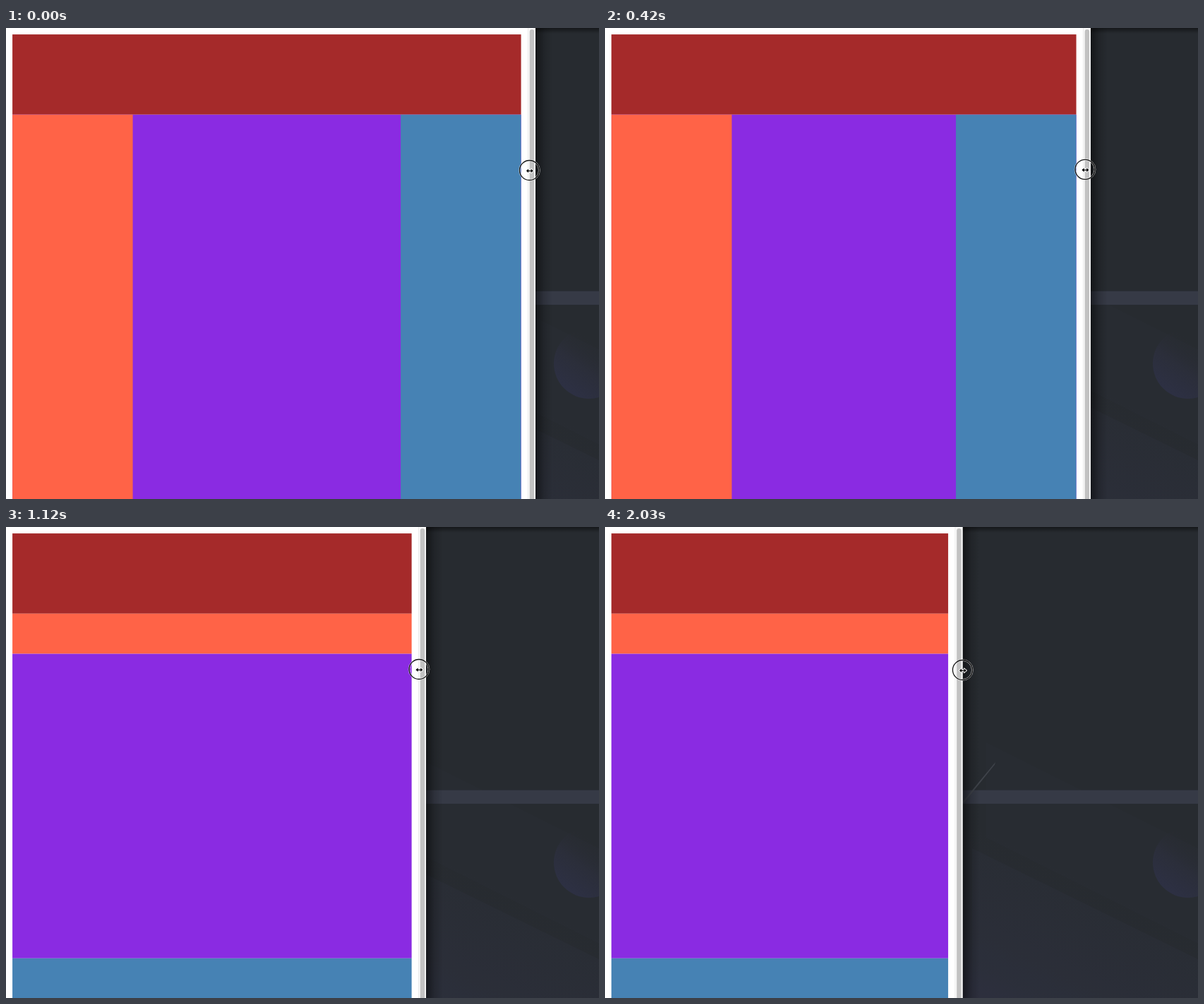
An HTML page with a canvas for the animation above (2.1 s loop, 840 by 667 pixels).

```html
<!DOCTYPE html>
<html lang="en">
<head>
<meta charset="utf-8">
<title>Responsive layout</title>
<style>
html, body { margin: 0; width: 100%; height: 100%; overflow: hidden; background: #272b31; }
canvas { display: block; }
</style>
</head>
<body>
<canvas id="stage" width="840" height="667"></canvas>
<script>
const ctx = document.getElementById('stage').getContext('2d');
const W = 840, H = 667, LOOP = 2100, STEP = 70;
const UNIT = 1.1365;            // stage pixels per page pixel
const BREAKPOINT = 600 * UNIT;

// Drag: time, window edge, pointer x, pointer y
const drag = [
  [0, 750, 741.5, 201.5],
  [350, 700, 691, 200.5],
  [630, 651, 647, 200],
  [1120, 595, 585, 201.5],
  [1400, 554, 545, 202.5],
  [1750, 525, 522, 201.5],
  [2030, 506.5, 506.5, 202.5]
];

function slope(i, k) {
  const a = drag[Math.max(i - 1, 0)], b = drag[Math.min(i + 1, drag.length - 1)];
  return (b[k] - a[k]) / (b[0] - a[0]);
}

// Cubic Hermite through the drag points
function at(t, k) {
  let i = 0;
  while (i < drag.length - 2 && t >= drag[i + 1][0]) i++;
  const a = drag[i], b = drag[i + 1], d = b[0] - a[0];
  const u = (t - a[0]) / d, v = 1 - u;
  return v * v * (1 + 2 * u) * a[k] + u * u * (3 - 2 * u) * b[k]
    + d * u * v * (v * slope(i, k) - u * slope(i + 1, k));
}

function rect(color, x, y, w, h) {
  ctx.fillStyle = color;
  ctx.fillRect(x, y, w, h);
}

function fade(x0, y0, x1, y1, ...stops) {
  const g = ctx.createLinearGradient(x0, y0, x1, y1);
  stops.forEach((c, i) => g.addColorStop(i / (stops.length - 1), c));
  return g;
}

function poly(color, ...pts) {
  ctx.fillStyle = color;
  ctx.beginPath();
  for (let i = 0; i < pts.length; i += 2) ctx.lineTo(pts[i], pts[i + 1]);
  ctx.closePath();
  ctx.fill();
}

function backdrop(edge) {
  rect('#272b30', 0, 0, W, H);
  rect(fade(540, 680, 640, 480, 'rgba(48,48,70,.6)', 'rgba(44,46,60,.3)', 'rgba(44,46,60,0)'), 480, 300, 360, 367);
  poly('rgba(48,50,62,.16)', 540, 305, 840, 455, 840, 590, 540, 440);
  poly('rgba(48,50,64,.28)', 520, 455, 840, 612, 840, 667, 520, 667);
  rect('#363a46', 480, 372.7, 360, 19.2);

  ctx.fillStyle = fade(793, 510, 838, 449, '#2d3043', '#2b2e3a', 'rgba(40,43,50,0)');
  ctx.beginPath();
  ctx.arc(826, 475, 50, 0, Math.PI * 2);
  ctx.fill();

  poly('#3f434a', 553, 333, 552, 336.5, 509, 390, 505, 391);

  rect(fade(edge, 0, edge + 24, 0, 'rgba(0,0,0,.5)', 'rgba(0,0,0,.16)', 'rgba(0,0,0,0)'), edge, 0, 24, H);
  rect(fade(0, 0, 0, 8, 'rgba(0,0,0,.45)', 'rgba(0,0,0,0)'), edge, 0, W - edge, 8);
}

function page(edge) {
  const l = 8 * UNIT, r = edge - 20.4, w = r - l, side = 150 * UNIT;
  const top = 8 * UNIT, y1 = top + 100 * UNIT, y2 = y1 + 50 * UNIT, y3 = 610.8;
  rect('#fff', 0, 0, edge, H);
  rect('#a52a2a', l, top, w, y1 - top);
  if (edge > BREAKPOINT) {
    rect('#8a2be2', l, y1, w, H - y1);
    rect('#ff6347', l, y1, side, H - y1);
    rect('#4682b4', r - side, y1, side, H - y1);
  } else {
    rect('#ff6347', l, y1, w, y2 - y1);
    rect('#8a2be2', l, y2, w, y3 - y2);
    rect('#4682b4', l, y3, w, H - y3);
  }
  rect('#fafafa', edge - 11, 0, 11, H);
  rect('#ebebeb', edge - 11, 0, 1, H);
  ctx.fillStyle = '#c2c2c2';
  ctx.beginPath();
  ctx.roundRect(edge - 8.3, 2, 6.5, H + 10, 3.2);
  ctx.fill();
}

function ring(x, y, r, color, width) {
  ctx.strokeStyle = color;
  ctx.lineWidth = width;
  ctx.beginPath();
  ctx.arc(x, y, r, 0, Math.PI * 2);
  ctx.stroke();
}

function pointer(x, y) {
  ring(x, y, 14.9, 'rgba(255,255,255,.6)', 1);
  ring(x, y, 13.1, 'rgba(255,255,255,.6)', 1);
  ring(x, y, 14, '#151515', 1.3);

  ctx.save();
  ctx.translate(x + 0.4, y + 0.8);
  ctx.beginPath();
  for (const s of [1, -1]) {
    ctx.lineTo(-1.8 * s, -0.6 * s);
    ctx.lineTo(1.8 * s, -0.6 * s);
    ctx.lineTo(1.8 * s, -2.8 * s);
    ctx.lineTo(5 * s, 0);
    ctx.lineTo(1.8 * s, 2.8 * s);
  }
  ctx.lineTo(-1.8, 0.6);
  ctx.closePath();
  ctx.lineJoin = 'round';
  ctx.strokeStyle = '#fff';
  ctx.lineWidth = 1.8;
  ctx.stroke();
  ctx.fillStyle = '#000';
  ctx.fill();
  ctx.restore();
}

function draw() {
  const t = Math.floor((performance.now() % LOOP) / STEP) * STEP;
  const edge = at(t, 1);
  backdrop(edge);
  page(edge);
  pointer(at(t, 2), at(t, 3));
  requestAnimationFrame(draw);
}
draw();
</script>
</body>
</html>
```
